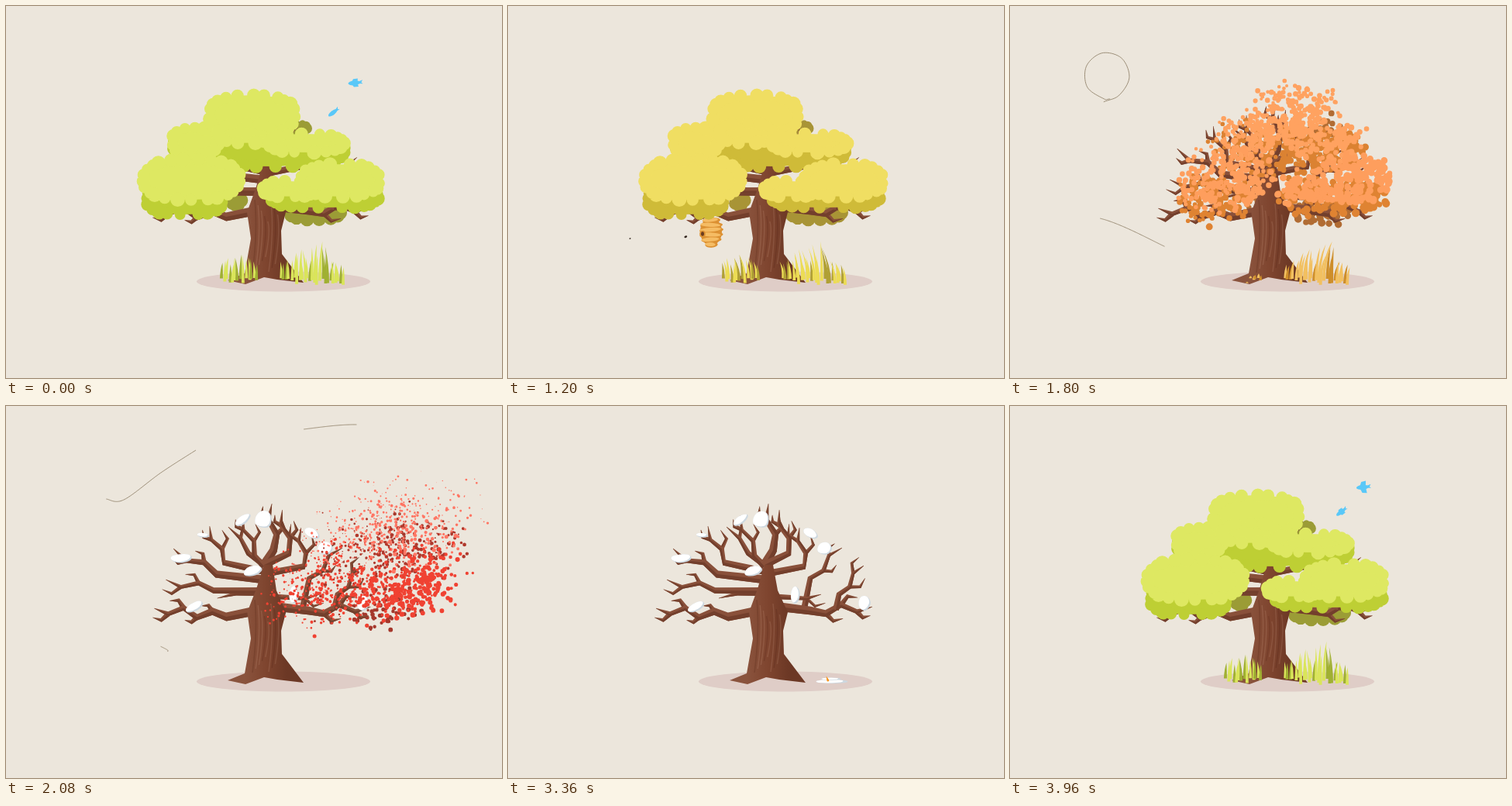
These frames come from a looping animation (640 by 480 pixels, 4000 ms). An HTML page with a canvas:

```html
<!DOCTYPE html>
<html lang="en">
<head>
<meta charset="utf-8">
<title>Tree through the seasons</title>
<style>
html, body { margin: 0; width: 100%; height: 100%; overflow: hidden; background: #ece6dc; }
canvas { display: block; width: 100vw; height: 100vh; }
</style>
</head>
<body>
<canvas id="stage" width="640" height="480"></canvas>
<script>
const ctx = document.getElementById('stage').getContext('2d');
const LOOP = 4000, TAU = Math.PI * 2;

const clamp = (v, a = 0, b = 1) => Math.max(a, Math.min(b, v));
const lerp = (a, b, u) => a + (b - a) * u;
const easeOut = u => 1 - (1 - clamp(u)) ** 3;
const points = s => s.split(' ').map(p => p.split(',').map(Number));
const range = n => Array.from({ length: n }, (_, i) => i);

// Piecewise linear value: keys are time, value, time, value...
function key(t, ...k) {
  if (t <= k[0]) return k[1];
  for (let i = 2; i < k.length; i += 2)
    if (t <= k[i]) return lerp(k[i - 1], k[i + 1], (t - k[i - 2]) / (k[i] - k[i - 2]));
  return k[k.length - 1];
}

let seed = 7;
function rand() {
  seed = (seed * 16807) % 2147483647;
  return seed / 2147483647;
}

// Catmull-Rom position at index u
function along(pts, u) {
  const n = pts.length - 1, i = clamp(Math.floor(u), 0, n - 1), f = u - i;
  const [a, b, c, d] = [-1, 0, 1, 2].map(k => pts[clamp(i + k, 0, n)]);
  return [0, 1].map(k => b[k] + 0.5 * f * (c[k] - a[k] +
    f * (2 * a[k] - 5 * b[k] + 4 * c[k] - d[k] + f * (3 * (b[k] - c[k]) + d[k] - a[k]))));
}

function poly(pts, fill) {
  ctx.beginPath();
  pts.forEach(p => ctx.lineTo(p[0], p[1]));
  ctx.closePath();
  ctx.fillStyle = fill;
  ctx.fill();
}

function oval(x, y, rx, ry, fill, turn = 0) {
  ctx.beginPath();
  ctx.ellipse(x, y, rx, ry, turn, 0, TAU);
  ctx.fillStyle = fill;
  ctx.fill();
}

// ---- Colours: spring, summer, autumn, late autumn ----
const red = [240, 66, 50];
const palette = {
  light: [[222, 232, 98], [240, 222, 98], [255, 165, 96], [255, 118, 100]],
  mid: [[190, 207, 52], [207, 187, 56], [222, 136, 50], [176, 56, 44]],
  dark: [[155, 156, 54], [168, 148, 54], [178, 112, 52], [165, 56, 44]],
  blade: [[218, 229, 90], [236, 220, 85], [242, 192, 96], [242, 192, 96]],
  blade2: [[160, 176, 50], [176, 160, 52], [206, 142, 42], [206, 142, 42]]
};
palette.low = [...palette.light.slice(0, 3), red];
palette.midLow = [...palette.mid.slice(0, 3), red];

function tint(name, t) {
  const s = t > 3300 ? 0 : key(t, 300, 0, 1150, 1, 1300, 1, 1780, 2, 2080, 3);
  const i = Math.min(2, Math.floor(s)), a = palette[name][i], b = palette[name][i + 1];
  return `rgb(${a.map((v, k) => Math.round(lerp(v, b[k], s - i))).join()})`;
}

// ---- Foliage: rounded clouds that scatter into leaves ----
// The wind frees leaves along a slanted front.
const freedAt = (x, y) => 1480 + (x - 170) * 0.7 + (y - 180) * 0.9;
const frontX = (t, y) => 170 + (t - 1480 - (y - 180) * 0.9) / 0.7;

function makeCloud(name, cx, cy, rx, ry) {
  const soft = v => Math.sign(v) * Math.abs(v) ** 0.8;
  const spot = (a, k, inset = 0) => [cx + soft(Math.cos(a)) * (rx - inset) * k, cy + soft(Math.sin(a)) * (ry - inset) * k];
  const r = Math.min(8, ry * 0.5), core = new Path2D(), bumps = new Path2D();
  const n = Math.round((rx + ry) * 3 / r / 1.55);
  for (const i of range(n)) {
    const [x, y] = spot((i + rand() * 0.4) / n * TAU, 1, r), q = r * (0.85 + rand() * 0.35);
    core.lineTo(x, y);
    bumps.moveTo(x + q, y);
    bumps.arc(x, y, q, 0, TAU);
  }
  const leaves = range(Math.round(rx * ry * 3.3 / 34)).map(() => {
    const [x, y] = spot(rand() * TAU, Math.sqrt(rand()));
    return {
      x, y, r: 3.8 + rand() * 2.2, start: freedAt(x, y) - rand() * 30,
      pull: 0.0005 + 0.0004 * rand() ** 2, drift: (rand() - 0.55) * 0.1, life: 600 + rand() * 260
    };
  });
  return { name, cx, cy, core, bumps, leaves, phase: rand() * TAU };
}

const back = [
  makeCloud('dark', 376, 158, 18, 12),
  makeCloud('dark', 298, 248, 14, 18),
  makeCloud('dark', 398, 266, 40, 17)
];
const front = [
  makeCloud('mid', 235, 180, 27, 20),
  makeCloud('mid', 400, 188, 44, 20),
  makeCloud('mid', 338, 190, 72, 25),
  makeCloud('midLow', 230, 250, 57, 27),
  makeCloud('midLow', 410, 247, 77, 21),
  makeCloud('light', 243, 175, 37, 26),
  makeCloud('light', 318, 141, 63, 34),
  makeCloud('light', 308, 164, 43, 21),
  makeCloud('light', 388, 177, 56, 20),
  makeCloud('low', 239, 224, 70, 34),
  makeCloud('low', 364, 236, 40, 18),
  makeCloud('low', 432, 225, 59, 29)
];

function drawCloud(c, t, order) {
  if (t > 2500 && t < 3400) return;
  ctx.fillStyle = tint(c.name, t);
  const grow = t < 3400 ? 1 : easeOut((t - 3400 - order * 16) / 330);
  if (grow > 0 && (t < 1900 || t >= 3400)) {
    ctx.save();
    if (t > 1300 && t < 3400) {
      ctx.beginPath();
      [[frontX(t, 80), 80], [640, 80], [640, 300], [frontX(t, 300), 300]].forEach(p => ctx.lineTo(...p));
      ctx.clip();
    }
    ctx.translate(c.cx + Math.sin(t / LOOP * TAU * 2 + c.phase) * 0.9, c.cy);
    ctx.scale(grow, grow);
    ctx.translate(-c.cx, -c.cy);
    ctx.fill(c.core);
    ctx.fill(c.bumps);
    ctx.restore();
  }
  if (t < 1350 || t > 3000) return;
  ctx.beginPath();
  for (const p of c.leaves) {
    const age = t - p.start, r = p.r * (1 - age / p.life);
    if (age < 0 || r < 0.2) continue;
    const x = p.x + p.pull * age * age, y = p.y + p.drift * age;
    ctx.moveTo(x + r, y);
    ctx.arc(x, y, r, 0, TAU);
  }
  ctx.fill();
}

// ---- Trunk and branches ----
const limbs = [];

// A limb runs from the trunk through an elbow, then zigzags to its tip and sprouts twigs.
function growLimb(w, elbow, tip, root) {
  const [ex, ey] = elbow, [tx, ty] = tip;
  const start = root || [331, clamp(205 + (ey - 190) * 0.7, 205, 264)];
  const len = Math.hypot(tx - ex, ty - ey), ux = (tx - ex) / len, uy = (ty - ey) / len;
  const steps = Math.max(1, Math.round(len / 19)), pts = [start, elbow];
  for (let i = 1; i <= steps; i++) {
    const side = (i % 2 ? 1 : -1), off = i < steps ? side * Math.min(5, len / 12) : 0;
    const x = lerp(ex, tx, i / steps) - uy * off, y = lerp(ey, ty, i / steps) + ux * off;
    pts.push([x, y]);
    if (i === steps) break;
    const a = Math.atan2(uy, ux) + side * 0.85, d = 15 + rand() * 10;
    limbs.push([w * 0.55, [[x, y], [x + Math.cos(a) * d * 0.6, y + Math.sin(a) * d * 0.6],
      [x + Math.cos(a - side * 0.5) * d, y + Math.sin(a - side * 0.5) * d]]]);
  }
  limbs.push([w, pts]);
}

growLimb(12, [284, 272], [191, 261]);
growLimb(7, [296, 242], [272, 248]);
growLimb(9, [267, 238], [205, 224]);
growLimb(11, [270, 217], [213, 184]);
growLimb(9, [279, 202], [258, 155]);
growLimb(8, [310, 190], [282, 156]);
growLimb(8, [318, 193], [300, 141]);
growLimb(12, [342, 186], [336, 126]);
growLimb(10, [362, 190], [350, 134]);
growLimb(9, [382, 207], [376, 157]);
growLimb(8, [390, 222], [431, 183], [382, 262]);
growLimb(7, [366, 247], [404, 243]);
growLimb(12, [390, 264], [470, 259]);
growLimb(8, [427, 243], [459, 206], [423, 263]);

const trunk = points('286,354 308,345 316,300 311,266 322,236 331,205 342,205 348,238 361,266 355,290 356,320 384,357 350,353 333,350 309,359');
const bendAt = (y, b) => b * Math.max(0, (300 - y) / 173) ** 2;
const treeBend = t => key(t, 1450, 0, 1800, 6, 2080, 7, 2350, 0);

function drawLimb(w, src, bend) {
  const pts = src.map(([x, y]) => [x + bendAt(y, bend), y]), n = pts.length - 1;
  const side = s => pts.map((p, i) => {
    const a = pts[Math.max(0, i - 1)], c = pts[Math.min(n, i + 1)];
    const dx = c[0] - a[0], dy = c[1] - a[1], d = Math.hypot(dx, dy);
    const h = i === n ? 0.2 : lerp(w, Math.max(3.4, w * 0.4), i / n) / 2;
    return [p[0] - dy / d * h * s, p[1] + dx / d * h * s];
  });
  poly([...side(1), ...side(-1).reverse()], '#89503a');
  poly([...side(pts[n][0] > pts[0][0] ? 1 : -1), ...pts.slice().reverse()], '#733f2c');
}

function drawTree(t) {
  const bend = treeBend(t);
  limbs.forEach(([w, p]) => drawLimb(w, p, bend));
  const g = ctx.createLinearGradient(308, 0, 362, 0);
  g.addColorStop(0, '#8a533d');
  g.addColorStop(0.5, '#7f452f');
  g.addColorStop(1, '#6c3825');
  poly(trunk.map(([x, y]) => [x + bendAt(y, bend), y]), g);
  ctx.lineWidth = 1.5;
  for (const i of range(8)) {
    const x = 320 + i * 4.2;
    ctx.strokeStyle = i % 3 ? 'rgba(255,215,190,.12)' : 'rgba(60,20,10,.16)';
    ctx.beginPath();
    ctx.moveTo(x + 1, 250 + i * 7 % 30);
    ctx.quadraticCurveTo(x + 5, 290, x - 2, 344 - i * 5 % 24);
    ctx.stroke();
  }
}

// ---- Grass ----
function growTuft(x0, x1, n, tall) {
  return range(n).map(i => {
    const u = (i + rand() * 0.8) / n;
    const h = 12 + tall * (0.35 + 0.65 * rand()) * Math.sin(0.25 + u * 2.5);
    return { x: lerp(x0, x1, u), y: 350 + rand() * 10, h, tilt: (rand() - 0.5) * 9, shade: rand() < 0.35 };
  });
}
const blades = [...growTuft(277, 326, 14, 32), ...growTuft(354, 437, 25, 42)];

function drawGrass(t) {
  const wind = t > 3400 ? 0 : key(t, 0, 0, 700, -2, 1200, -6, 1450, -2, 1800, 6, 2000, 12);
  blades.forEach((b, i) => {
    const size = t < 3400 ? 1 - clamp((t - 1620 - (b.x - 277) * 2) / 130)
      : easeOut((t - 3500 - (i % 5) * 20) / 320);
    if (size < 0.03) return;
    const h = b.h * size, y = b.y;
    const tip = b.x + h / 45 * (wind + b.tilt + Math.sin(t / LOOP * TAU * 2 + i));
    ctx.fillStyle = tint(b.shade ? 'blade2' : 'blade', t);
    ctx.beginPath();
    ctx.moveTo(b.x - 2, y);
    ctx.quadraticCurveTo(b.x - 1.4, y - h * 0.6, tip, y - h);
    ctx.quadraticCurveTo(b.x + 2, y - h * 0.5, b.x + 2, y);
    ctx.fill();
  });
}

// ---- Beehive and bees ----
function drawHive(t) {
  const s = t < 1500 ? easeOut((t - 680) / 250) : 1 - clamp((t - 1560) / 130);
  if (s <= 0) return;
  ctx.save();
  ctx.translate(262, 272);
  ctx.scale(s, s);
  oval(0, 19, 14, 18, '#dc9133');
  for (const i of range(6)) {
    const y = 4 + i * 6.3, w = 15.5 * Math.sqrt(1 - ((i - 2.2) / 3.3) ** 2);
    oval(0.5, y + 0.6, w, 3.6, '#dc9133', -0.06);
    oval(-1, y, w - 1.5, 2.6, '#f5bc64', i % 2 ? 0.05 : -0.08);
  }
  oval(-11, 22, 3.8, 4.3, '#dc9133');
  oval(-11, 22, 2, 2.8, '#6b3c20');
  ctx.restore();
}

function drawBees(t) {
  for (const i of range(2)) {
    const age = t - 1000 - i * 148;
    if (age < 0 || age > 440) continue;
    oval(255 - age * 0.485, 297 - i * 2 + Math.sin(age / 24) * 3.5, 1.1 + i * 0.9, 0.8 + i * 0.5, '#33271f', -0.4);
  }
}

// ---- Birds ----
const flights = [
  points('410,165 464,138 455,105 428,91 398,108 385,145'),
  points('400,178 434,152 427,137 402,148 382,165 370,175')
];
function drawBirds(t) {
  const u = ((t + LOOP - 3640) % LOOP) / 160;
  if (u >= 5) return;
  flights.forEach((path, i) => {
    const flap = Math.cos((u - 2) * TAU / 1.1 + i * 1.7), s = i ? 0.88 : 1;
    ctx.save();
    ctx.translate(...along(path, u));
    ctx.rotate(i ? -0.65 : -0.1);
    ctx.scale(-s, s);
    oval(0, 0, 8, 3, '#5ac8f8');
    poly(points('-4,-1 -11,-3 -9,0 -11,2 -4,1'), '#5ac8f8');
    for (const side of [-1, 1])
      poly([[-4, 0], [-5, side * (5 + 3 * flap)], [1, side * (5 + 2 * flap)], [4, 0]], '#5ac8f8');
    ctx.restore();
  });
}

// ---- Wind: each gust shows a moving stretch of its path ----
const loop = range(7).map(i => [125 + 29 * Math.cos(1 - i * 0.93), 90 + 30 * Math.sin(1 - i * 0.93)]);
const gusts = [
  { path: [...points('41,140 85,138 120,124'), ...loop, ...points('129,120 152,121 200,86 245,57')],
    head: [1480, 0, 1680, 8, 1800, 10, 2080, 13], tail: [1680, 0, 1800, 2, 2080, 10, 2220, 13] },
  { path: points('350,36 384,30 452,24 519,32 529,34'),
    head: [1950, 0, 2080, 2, 2400, 4], tail: [1990, 0, 2080, 1, 2640, 3, 2720, 4] },
  { path: points('41,273 116,274 199,310 209,317'),
    head: [1560, 0, 1800, 2, 1900, 3], tail: [1700, 0, 1800, 1, 2080, 2, 2160, 3] }
];

function drawWind(t) {
  ctx.strokeStyle = '#95866f';
  ctx.lineWidth = 0.9;
  for (const { path, head, tail } of gusts) {
    const to = key(t, ...head), from = key(t, ...tail);
    if (to - from < 0.02) continue;
    ctx.beginPath();
    for (const i of range(81)) ctx.lineTo(...along(path, lerp(from, to, i / 80)));
    ctx.stroke();
  }
}

// ---- Snow ----
function makeDrift(x, y, rx, ry, turn) {
  const n = 7, pts = range(n).map(i => {
    const a = i / n * TAU, k = 1.02 + rand() * 0.3;
    const px = Math.cos(a) * rx * k, py = Math.sin(a) * ry * k;
    return [px * Math.cos(turn) - py * Math.sin(turn), px * Math.sin(turn) + py * Math.cos(turn)];
  });
  const half = i => [0, 1].map(k => (pts[i % n][k] + pts[(i + 1) % n][k]) / 2);
  const path = new Path2D();
  path.moveTo(...half(n - 1));
  pts.forEach((p, i) => path.quadraticCurveTo(...p, ...half(i)));
  return { x, y, sink: ry * 0.4, path };
}
const drifts = [
  makeDrift(224, 195, 21, 9, -0.05),
  makeDrift(251, 166, 12, 5, 0.1),
  makeDrift(300, 146, 18, 8, -0.6),
  makeDrift(327, 144, 17, 17, 0),
  makeDrift(391, 163, 17, 9, 0.5),
  makeDrift(408, 181, 15, 14, 0),
  makeDrift(317, 211, 19, 11, -0.2),
  makeDrift(243, 258, 19, 9, -0.45),
  makeDrift(371, 241, 10, 17, 0),
  makeDrift(460, 252, 12, 15, -0.2)
];

function drawDrifts(t) {
  const s = key(t, 1880, 0, 2080, 0.6, 2500, 1, 2840, 1, 3360, 0.58, 3520, 0);
  if (s <= 0) return;
  for (const d of drifts) {
    ctx.save();
    ctx.translate(d.x + bendAt(d.y, treeBend(t)), d.y + d.sink);
    ctx.scale(s, s);
    ctx.translate(0, -d.sink);
    ctx.fillStyle = '#cdd8e0';
    ctx.fill(d.path);
    ctx.clip(d.path);
    ctx.translate(-3, -2.5);
    ctx.fillStyle = '#fff';
    ctx.fill(d.path);
    ctx.restore();
  }
}

function shadedBall(x, y, r) {
  ctx.save();
  oval(x, y, r, r, '#cdd8e0');
  ctx.clip();
  oval(x - r * 0.3, y - r * 0.22, r, r, '#fff');
  ctx.restore();
}

const flakes = points('370,22 388,62 267,94 443,150 209,182');
function drawFlakes(t) {
  if (t < 2150 || t > 3350) return;
  for (const wave of range(2)) {
    for (const [x0, y0] of flakes) {
      const x = x0 + wave * 37, y = y0 - wave * 150 + (t - 2640) * 0.24;
      const crown = 130 + 110 * ((x - 330) / 140) ** 2;
      if (y > -5 && y < crown) shadedBall(x, y, 4);
    }
  }
}

function drawSnowman(t) {
  const size = easeOut((t - 2250) / 300) * (1 - clamp((t - 3400) / 140));
  if (size <= 0) return;
  const melt = clamp((t - 2840) / 500);
  ctx.save();
  ctx.translate(lerp(423, 418, melt), 358);
  ctx.scale(size * lerp(1, 0.87, melt), size * lerp(1, 0.11, melt));
  shadedBall(0, -23, 23.5);
  shadedBall(-1, -54, 14.5);
  if (melt < 0.85) for (const x of [-12, -6]) oval(x, -61, 1.3, 1.3, '#222');
  ctx.restore();
  ctx.save();
  ctx.translate(lerp(415, 413, melt), lerp(358 - 53 * size, 355, melt));
  ctx.rotate(melt * 1.35);
  const s = size * lerp(1, 0.45, melt);
  ctx.scale(s, s);
  poly(points('-15,2 -4,-3 0,-3 1,0 0,3 -4,3'), '#f7941d');
  ctx.restore();
}

function draw(t) {
  ctx.fillStyle = '#ece6dc';
  ctx.fillRect(0, 0, 640, 480);
  oval(358, 355.5, 112, 13, '#dfcdc7');
  drawBirds(t);
  back.forEach((c, i) => drawCloud(c, t, i));
  drawTree(t);
  drawHive(t);
  drawDrifts(t);
  front.forEach((c, i) => drawCloud(c, t, i));
  drawGrass(t);
  drawSnowman(t);
  drawFlakes(t);
  drawWind(t);
  drawBees(t);
}

const begin = performance.now();
function frame() {
  draw((performance.now() - begin) % LOOP);
  requestAnimationFrame(frame);
}
frame();
</script>
</body>
</html>
```
